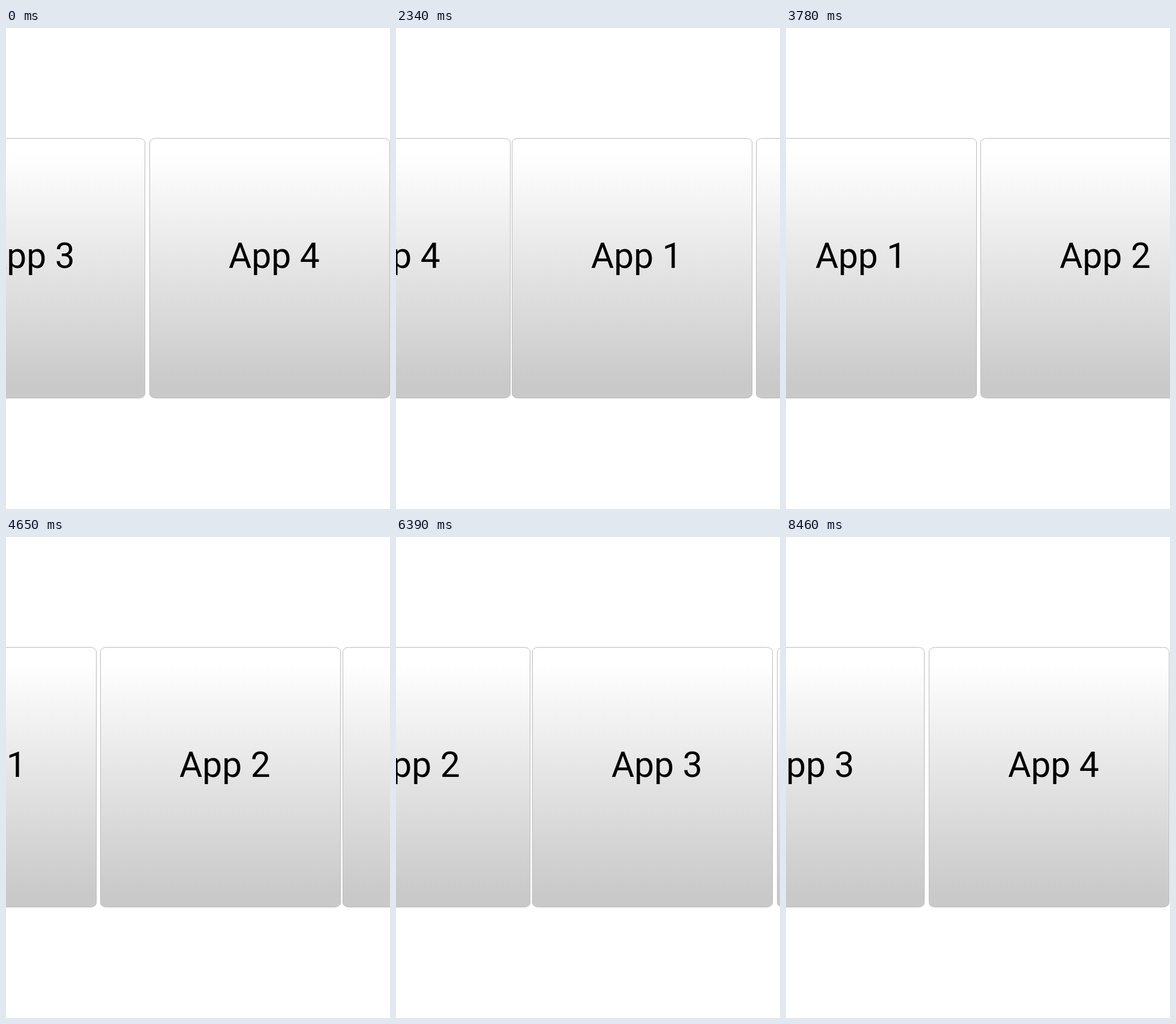
Animation, 640 px wide and 800 px high, one loop 8.56 s. Source, as an HTML page:

```html
<!DOCTYPE html>
<html lang="en">
<head>
<meta charset="utf-8">
<title>App carousel</title>
<style>
  /* An integer property keeps the strip on whole pixels. */
  @property --shift {
    syntax: "<integer>";
    inherits: false;
    initial-value: 0;
  }

  html, body {
    margin: 0;
    width: 100%;
    height: 100%;
    overflow: hidden;
    background: #fff;
  }

  svg {
    display: block;
    width: 640px;
    height: 800px;
  }

  .strip {
    transform: translateX(calc(var(--shift) * -1px));
    animation: slide 8560ms infinite;
  }

  /* 282 steps of 30 ms, then a 100 ms hold. */
  @keyframes slide {
    0% { --shift: 0; animation-timing-function: steps(282); }
    98.83178%, 100% { --shift: 1623; }
  }

  text {
    font: 58.67px Roboto, sans-serif;
    fill: #000;
  }
</style>
</head>
<body>
<svg viewBox="0 0 640 800">
  <defs>
    <linearGradient id="shade" x1="0" y1="0" x2="0" y2="1">
      <stop offset=".06" stop-color="#fff"/>
      <stop offset=".95" stop-color="#c9c9c9"/>
    </linearGradient>
    <rect id="card" x=".5" y="183.5" width="400" height="432" rx="10" ry="7"
          fill="url(#shade)" stroke="#bbb"/>
  </defs>
  <g class="strip">
    <g transform="translate(-169)"><use href="#card"/><text x="132" y="399">App 3</text></g>
    <g transform="translate(239)"><use href="#card"/><text x="132" y="399">App 4</text></g>
    <g transform="translate(642)"><use href="#card"/><text x="132" y="399">App 1</text></g>
    <g transform="translate(1049)"><use href="#card"/><text x="132" y="399">App 2</text></g>
    <g transform="translate(1453)"><use href="#card"/><text x="132" y="399">App 3</text></g>
    <g transform="translate(1861)"><use href="#card"/><text x="132" y="399">App 4</text></g>
  </g>
</svg>
</body>
</html>
```
